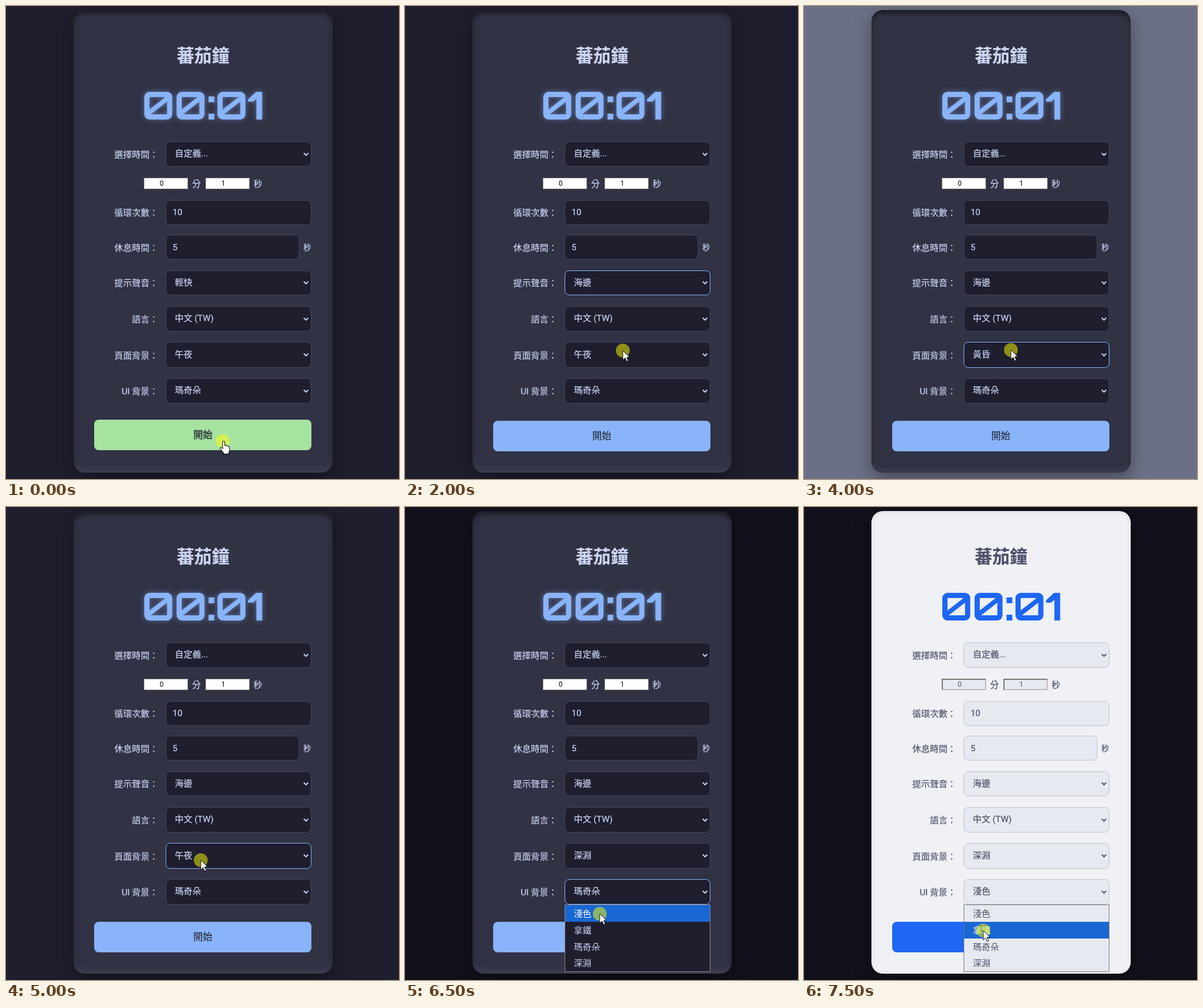
Write an HTML page that moves like this. It is 682x821 px and loops after 8000 ms.

```html
<!DOCTYPE html>
<html lang="zh-TW">
<head>
<meta charset="utf-8">
<title>蕃茄鐘</title>
<style>
  html, body { margin: 0; width: 100%; height: 100%; overflow: hidden; }
  #stage {
    --panel: #313244; --field: #1e1e2e; --line: #45475a; --text: #cdd6f4;
    --accent: #89b4fa; --ink: #1e1e2e; --menuline: #8a8a92;
    --inner: inset 0 5px 10px rgba(0,0,0,.5), inset 0 -5px 10px rgba(255,255,255,.08);
    --glow: drop-shadow(0 0 5px rgba(137,180,250,.5));
    position: relative; width: 682px; height: 821px; overflow: hidden;
    color: var(--text);
    font: 15.2px Roboto, "Noto Sans CJK TC", "Noto Sans CJK", sans-serif;
  }
  #stage.light {
    --panel: #eff1f5; --field: #e6e9ef; --line: #bcc0cc; --text: #4c4f69;
    --accent: #1e66f5; --ink: #eff1f5; --menuline: #767676;
    --inner: inset 0 2px 8px rgba(0,0,0,.08);
    --glow: none;
  }
  #stage div, #stage svg { position: absolute; box-sizing: border-box; }
  #panel {
    left: 117px; top: 7px; width: 450px; height: 803px; border-radius: 20px;
    background: var(--panel);
    box-shadow: 0 10px 30px rgba(0,0,0,.35), var(--inner);
  }
  #form, #buttons { inset: 0; }
  .txt { white-space: pre; line-height: 24px; height: 24px; -webkit-text-stroke: .2px; }
  .title {
    left: 117px; top: 67px; width: 450px; height: 40px; line-height: 40px;
    font-size: 30.5px; font-weight: 700; text-align: center;
  }
  .field { background: var(--field); border: 1px solid var(--line); border-radius: 8px; }
  .field.focus { border-color: #89b4fa; }
  .num {
    top: 298px; width: 77px; height: 20px; background: #fff; border: 1px solid #767676;
    color: #000; font-size: 12px; line-height: 18px; text-align: center; padding-right: 15px;
  }
  .light .num {
    background: var(--field); color: var(--text); line-height: 16px;
    border: 2px solid; border-color: #767676 #bcbcc0 #bcbcc0 #767676;
  }
  .btn {
    height: 53px; top: 720px; border-radius: 8px; background: var(--accent); color: var(--ink);
    font-size: 16.6px; line-height: 54px; text-align: center;
  }
  .btn.hover { top: 718px; background: #a6e3a1; text-shadow: 1px 1px 2px rgba(0,0,0,.35); }
  #menu { left: 277px; width: 253px; height: 117px; background: var(--field); border: 1px solid var(--menuline); }
  .item { left: 0; width: 100%; height: 28.75px; line-height: 30px; padding-left: 15px; }
  .item.on { background: #1967d2; color: #fff; }
  #timer { left: 0; top: 0; fill: none; stroke: var(--accent); filter: var(--glow); overflow: visible; }
  #timer .solid { fill: var(--accent); stroke: none; }
  #cursor { width: 1px; height: 1px; overflow: visible; }
</style>
</head>
<body>
<div id="stage">
  <div id="panel"></div>
  <svg id="timer" width="682" height="230" role="img">
    <defs>
      <g id="zero">
        <rect x="4.5" y="153.5" width="39.5" height="39" rx="4.5" stroke-width="9"/>
        <path d="M6 187L42 159" stroke-width="8"/>
      </g>
      <path id="one" class="solid" d="M0 162L14 149H24.5V197H14.5V161L9 166H0Z"/>
      <path id="colon" class="solid" d="M0 157h10v10H0zM0 187h10v10H0z"/>
    </defs>
    <g id="digits"></g>
  </svg>
  <div id="form"></div>
  <div id="buttons"></div>
  <div id="menu"></div>
  <svg id="cursor">
    <circle r="12" fill="#ff0" fill-opacity=".5"/>
    <path id="arrow" fill="#fff" stroke="#111" stroke-width="1"
      d="M0 0V16.5L4 12.8L6.8 19L9.5 17.8L6.8 11.8H12Z"/>
    <path id="hand" fill="#fff" stroke="#111" stroke-width="1.1" stroke-linejoin="round"
      d="M0 2Q0 0 1.8 0T3.6 2V8Q6 6.4 7 8.6Q9 7.4 9.8 9.6Q12 9 12 11.5V16Q12 18 10.5 20V22.5H1.5V20.5L-4.4 13.5Q-5 11.5-3 11.2Q-1.6 11.3 0 13.4Z"/>
  </svg>
</div>
<script>
const $ = id => document.getElementById(id);
const stage = $('stage'), form = $('form'), menu = $('menu');

function add(parent, cls, style, text = '') {
  const el = document.createElement('div');
  el.className = cls;
  for (const k in style) el.style[k] = style[k] + 'px';
  el.textContent = text;
  parent.appendChild(el);
  return el;
}

// y is the vertical centre of the line
const text = (x, y, str, size = 15.2) =>
  add(form, 'txt', { left: x, top: y - 11.5, fontSize: size }, str);
const label = (y, str) => add(form, 'txt', { right: 418, top: y - 11.5 }, str);
const field = (y, h, w = 253) => add(form, 'field', { left: 277, top: y, width: w, height: h });

function select(y, h, name, labelY, value) {
  const box = field(y, h);
  const mid = y + h / 2 - 0.5;
  label(labelY, name);
  form.insertAdjacentHTML('beforeend',
    `<svg style="left:515px;top:${mid - 3}px" width="12" height="8">
       <path d="M1.7 1.3L5.6 5.2L9.5 1.3" fill="none" stroke="var(--text)" stroke-width="2"/></svg>`);
  return { box, value: text(293, mid - 1, value), bottom: y + h };
}

add(form, 'txt title', {}, '蕃茄鐘');
select(235, 44, '選擇時間：', 257, '自定義...');
add(form, 'num', { left: 239 }, '0');
text(323, 308, '分');
add(form, 'num', { left: 346 }, '1');
text(429.5, 308, '秒');
label(358, '循環次數：');
field(337, 43);
text(289, 357, '10');
label(419, '休息時間：');
field(397, 43, 232);
text(289, 418.5, '5');
text(516, 419.5, '秒', 13.3);

const lists = {
  sound: select(459, 43, '提示聲音：', 480, '輕快'),
  lang: select(521, 44, '語言：', 543.5, '中文 (TW)'),
  page: select(583, 45, '頁面背景：', 606, '午夜'),
  ui: select(646, 44, 'UI 背景：', 668, '瑪奇朵')
};
const options = {
  sound: ['輕快', '森林', '雨聲', '海邊'],
  page: ['淺色', '黃昏', '午夜', '深淵'],
  ui: ['淺色', '拿鐵', '瑪奇朵', '深淵']
};
const pageColors = ['#e6e9ef', '#6c7086', '#1e1e2e', '#11111b'];

const items = options.ui.map((_, i) => add(menu, 'item', { top: i * 28.75 }));

// Each step lasts 500 ms.
const STEP = 500;
const steps = [
  { at: [376, 755], hover: true, sound: 0, page: 2, ui: 2 },
  { at: [376, 753], running: true, hover: true },
  { at: [377, 490] },
  { at: [378, 598], open: 'sound', pick: 3 },
  { at: [378, 598], focus: 'sound', sound: 3 },
  { at: [377, 642], open: 'page', pick: 0 },
  { at: [376, 605], focus: 'page', page: 0 },
  { at: [368, 671], open: 'page', pick: 1 },
  { at: [359, 597], focus: 'page', page: 1 },
  { at: [345, 700], open: 'page', pick: 2 },
  { at: [338, 613], focus: 'page', page: 2 },
  { at: [338, 724], open: 'page', pick: 3 },
  { at: [338, 724], focus: 'page', page: 3, hover: true },
  { at: [338, 706], open: 'ui', pick: 0 },
  { at: [322, 667], ui: 0 },
  { at: [311, 735], open: 'ui', pick: 1 }
];

// Chosen options carry over to the following steps.
const chosen = {};
for (const s of steps) {
  for (const key in options) s[key] = chosen[key] = s[key] ?? chosen[key];
}

function drawTimer(running) {
  const use = (id, x) => `<use href="#${id}" x="${x}"/>`;
  const x = running ? 226 : 240;
  $('digits').innerHTML = use('zero', x) + use('zero', x + 56) + use('colon', x + 111.5) +
    use('zero', x + 127) + (running ? use('zero', x + 183) : use('one', x + 180));
  $('timer').setAttribute('aria-label', running ? '00:00' : '00:01');
}

function drawButtons(running, hover) {
  const box = $('buttons');
  box.textContent = '';
  const button = (left, width, str, hot) => add(box, hot ? 'btn hover' : 'btn', { left, width }, str);
  if (running) {
    button(153, 184, '暫停', false);
    button(346, 184, '重設', hover);
  } else {
    button(153, 377, '開始', hover);
  }
}

function draw(s) {
  const light = s.ui === 0;
  const focus = s.focus || (light ? '' : s.open);

  stage.className = light ? 'light' : '';
  document.body.style.background = stage.style.background = pageColors[s.page];
  for (const key in options) {
    lists[key].value.textContent = options[key][s[key]];
    lists[key].box.classList.toggle('focus', key === focus);
  }

  menu.style.display = s.open ? '' : 'none';
  if (s.open) {
    menu.style.top = lists[s.open].bottom + 'px';
    items.forEach((el, i) => {
      el.textContent = options[s.open][i];
      el.classList.toggle('on', i === s.pick);
    });
  }

  drawTimer(s.running);
  drawButtons(s.running, s.hover);
  $('cursor').style.left = s.at[0] + 'px';
  $('cursor').style.top = s.at[1] + 'px';
  $('hand').style.display = s.hover ? '' : 'none';
  $('arrow').style.display = s.hover ? 'none' : '';
}

let shown = -1;
const start = performance.now();
function tick() {
  const n = Math.floor((performance.now() - start) / STEP) % steps.length;
  if (n !== shown) draw(steps[shown = n]);
  requestAnimationFrame(tick);
}
tick();
</script>
</body>
</html>
```
